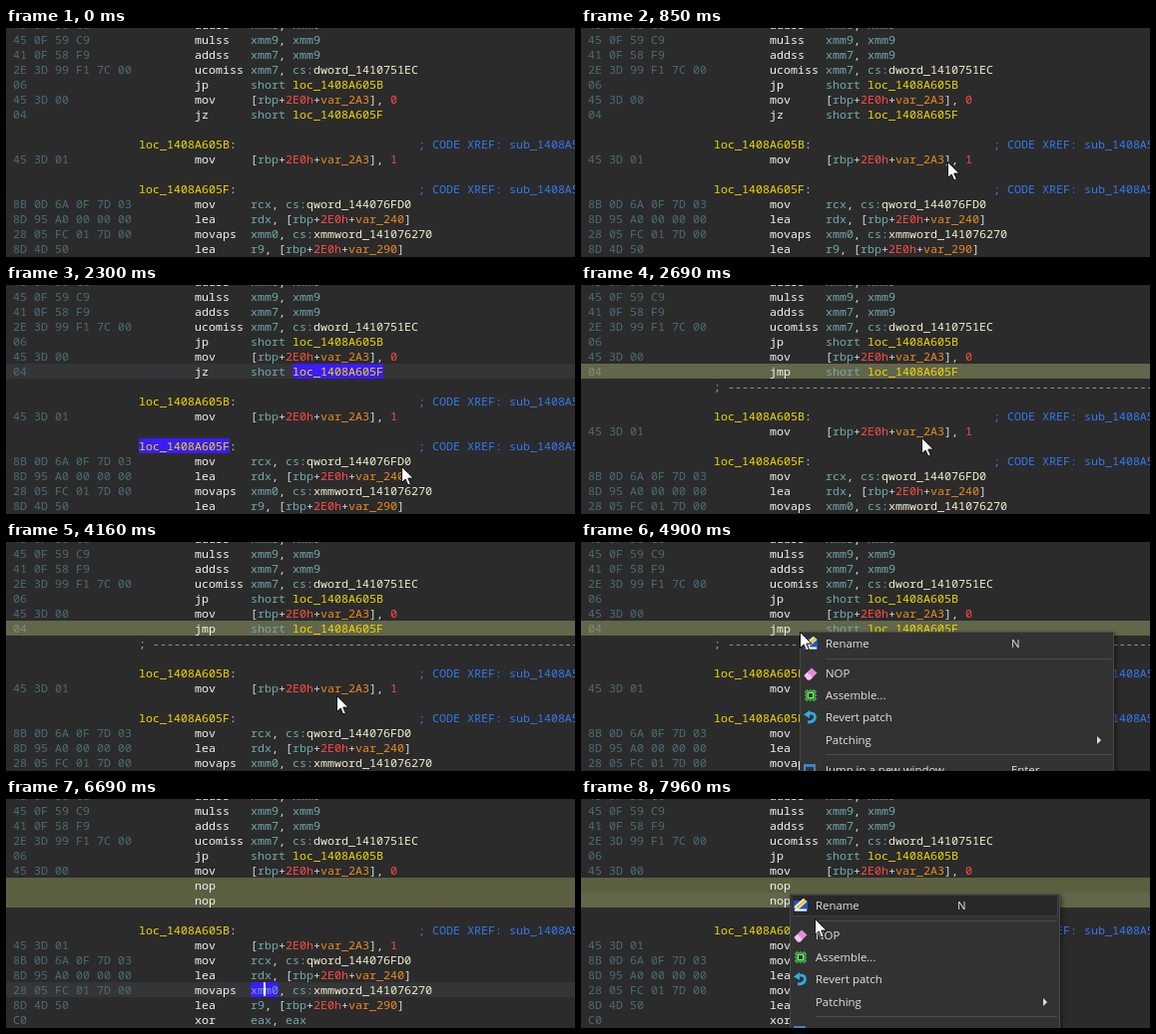
These frames come from a looping animation (570 px wide and 230 px high, 8000 ms). An HTML page:

```html
<!DOCTYPE html>
<html lang="en">
<head>
<meta charset="utf-8">
<title>Patching a jump in a disassembly</title>
<style>
html, body { margin: 0; width: 100%; height: 100%; overflow: hidden; background: #2b2b2b; }
#stage { position: relative; width: 570px; height: 230px; overflow: hidden; background: #2b2b2b; }
.row, .row span { position: absolute; white-space: pre; }
.row { left: 0; width: 570px; height: 15px; font: 11.667px/15px "Noto Sans Mono", "DejaVu Sans Mono", monospace; color: #d4dae0; }
.row span { top: 0; height: 15px; }
.patched { background: #5c6041; }
.current { background: #343536; }
.patched.current { background: #62664a; }
.hex { color: #4d6b78; }
.patched .hex { color: #878b78; }
.op { color: #f4f4f4; }
.loc { color: #f0d800; }
.var { color: #ee8a1c; }
.data { color: #f3f0cf; }
.reg { color: #73a9ad; }
.num { color: #ff4a42; }
.note { color: #3478f0; }
.rule { color: #a0a0a0; }
.row .hl { background: #3a1cff; }
#caret { position: absolute; width: 2px; height: 14px; background: #fff; }
#menu { position: absolute; height: 300px; box-sizing: border-box; background: #323232; border: 1px solid #4a4a4a;
  box-shadow: 2px 2px 4px rgba(0,0,0,.45); font: 11.4px/22px "Open Sans", "Noto Sans", sans-serif; color: #e4e4e4; }
.item { position: absolute; left: 1px; right: 1px; height: 22px; box-sizing: border-box; white-space: pre; }
.item.on { background: #282828; box-shadow: inset 0 0 0 1px #3e3e3e; }
.item span { position: absolute; top: 0; }
.item svg { position: absolute; left: 1px; top: 3px; }
.sep { position: absolute; left: 25px; right: 2px; height: 1px; background: #4c4c4c; }
#mouse { position: absolute; left: 0; top: 0; overflow: visible; }
</style>
</head>
<body>
<div id="stage">
  <div id="code"></div>
  <div id="caret"></div>
  <div id="menu"></div>
  <svg id="mouse" width="13" height="20"><path d="M.5 .5V16.5L4.2 13L6.7 19L9.3 17.9L6.8 12.1H12Z" fill="#fff" stroke="#111"/></svg>
</div>
<script>
const LOOP = 8000, CHAR = 7, LINE = 15, TOP = 4, LEFT = 7;
const $ = id => document.getElementById(id);
const codeBox = $('code'), caret = $('caret'), menuBox = $('menu'), mouse = $('mouse');

// ---- listing ----
const ins = (hex, op, args = '', patched = false) => ({ hex, op, args, patched });
const label = name => ({ name });
const blank = {}, rule = { rule: true };
const LOC_B = 'loc_1408A605B', LOC_F = 'loc_1408A605F';

const head = [
  ins('45 0F 58 C1', 'addss', 'xmm8, xmm9'),
  ins('45 0F 59 C9', 'mulss', 'xmm9, xmm9'),
  ins('41 0F 58 F9', 'addss', 'xmm7, xmm9'),
  ins('2E 3D 99 F1 7C 00', 'ucomiss', 'xmm7, cs:dword_1410751EC'),
  ins('06', 'jp', 'short ' + LOC_B),
  ins('45 3D 00', 'mov', '[rbp+2E0h+var_2A3], 0')
];
const partB = [blank, label(LOC_B), ins('45 3D 01', 'mov', '[rbp+2E0h+var_2A3], 1')];
const partF = [blank, label(LOC_F)];
const tail = [
  ins('8B 0D 6A 0F 7D 03', 'mov', 'rcx, cs:qword_144076FD0'),
  ins('8D 95 A0 00 00 00', 'lea', 'rdx, [rbp+2E0h+var_240]'),
  ins('28 05 FC 01 7D 00', 'movaps', 'xmm0, cs:xmmword_141076270'),
  ins('8D 4D 50', 'lea', 'r9, [rbp+2E0h+var_290]'),
  ins('C0', 'xor', 'eax, eax')
];
const nop = ins('', 'nop', '', true);
const listings = {
  plain: [...head, ins('04', 'jz', 'short ' + LOC_F), ...partB, ...partF, ...tail],
  jump: [...head, ins('04', 'jmp', 'short ' + LOC_F, true), rule, ...partB, ...partF, ...tail],
  nops: [...head, nop, nop, ...partB, ...partF, ...tail],
  merged: [...head, nop, nop, ...partB, ...tail]
};

const TOKEN = /(loc_\w+)|(var_\w+)|((?:d|q|xmm)word_\w+)|(xmm\d|rbp|rcx|rdx|r9|eax|cs:|short)|(\d\w*)|[^\w]+/g;
const KINDS = ['loc', 'var', 'data', 'reg', 'num'];

const span = (col, text, cls) => `<span class="${cls}" style="left:${LEFT + col * CHAR}px">${text}</span>`;

function tokens(text, col, mark) {
  return [...text.matchAll(TOKEN)].map(m => {
    const kind = KINDS[m.slice(1).findIndex(Boolean)] || '';
    return span(col + m.index, m[0], kind + (m[0] === mark ? ' hl' : ''));
  }).join('');
}

function rowHtml(r, mark) {
  if (r.rule) return span(18, '; ' + '-'.repeat(64), 'rule');
  if (r.name) return tokens(r.name + ':', 18, mark) + span(58, '; CODE XREF: sub_1408A5F0', 'note');
  if (r.op) return span(0, r.hex, 'hex') + span(26, r.op, 'op') + tokens(r.args, 34, mark);
  return '';
}

function drawCode({ list, mark, line }) {
  codeBox.innerHTML = listings[list].slice(0, 16).map((r, i) => {
    const n = i - 1;
    const cls = 'row' + (r.patched ? ' patched' : '') + (n === line ? ' current' : '');
    return `<div class="${cls}" style="top:${TOP + n * LINE}px">${rowHtml(r, mark)}</div>`;
  }).join('');
}

// ---- context menu ----
const svg = body => `<svg width="16" height="16">${body}</svg>`;
const icons = {
  rename: svg('<path d="M1 3H15V14H1Z" fill="#2454c8"/><path d="M2 12.5H14" stroke="#fff" stroke-width="2"/><path d="M3 11L12.5 2.5" stroke="#fff" stroke-width="5"/><path d="M4 10.5L13 2.5" stroke="#f0c030" stroke-width="3"/>'),
  eraser: svg('<path d="M1.5 10L9 2.5L14.5 7.5L7.5 14.5H5Z" fill="#e48bdc"/><path d="M1.5 10L4.5 7L10 12L7.5 14.5H5Z" fill="#f6c6f0"/>'),
  chip: svg('<path d="M2 4.5H14M2 8H14M2 11.5H14M4.5 2V14M8 2V14M11.5 2V14" stroke="#4fae4c" stroke-width="1.4"/><path d="M3 3H13V13H3Z" fill="#37a03a"/><path d="M5.5 5.5H10.5V10.5H5.5Z" fill="#173f1c" stroke="#9be08e"/>'),
  fork: svg('<path d="M3 4Q7 4 8 9" fill="none" stroke="#e04438" stroke-width="3"/><path d="M13 4Q9 4 8 9" fill="none" stroke="#3b8de8" stroke-width="3"/><path d="M8 8V14" stroke="#3fbf6a" stroke-width="3"/><path d="M1 1.5L6 2L2 6.5Z" fill="#e04438"/><path d="M15 1.5L10 2L14 6.5Z" fill="#3b8de8"/>'),
  revert: svg('<path d="M4 5Q12 2 12.5 8Q12 13 5 13" fill="none" stroke="#2cabe2" stroke-width="2.8"/><path d="M1 5.5L7 1V9Z" fill="#2cabe2"/>'),
  window: svg('<path d="M1 2H13V14H1Z" fill="#3f83c8"/><path d="M3 5H11V12H3Z" fill="#323232"/>')
};
const CENTERS = [12, 42, 64, 86, 109, 139];

function menuItems(patched) {
  return [
    ['rename', 'Rename', 'N'],
    ['eraser', 'NOP'],
    ['chip', 'Assemble...'],
    patched ? ['revert', 'Revert patch'] : ['fork', 'Force jump'],
    ['', 'Patching', '', true],
    ['window', 'Jump in a new window', 'Enter']
  ];
}

function drawMenu(m, hover) {
  const items = menuItems(m.patched).map(([icon, text, key, sub], i) =>
    `<div class="item${i === hover ? ' on' : ''}" style="top:${CENTERS[i] - 12}px">${icons[icon] || ''}` +
    `<span style="left:24px">${text}</span>` +
    (key ? `<span style="left:${m.w - 105}px">${key}</span>` : '') +
    (sub ? `<svg style="left:${m.w - 20}px" width="8" height="16"><path d="M1 4L5 8L1 12Z" fill="#ddd"/></svg>` : '') +
    '</div>').join('');
  menuBox.innerHTML = items + [26, 122].map(y => `<div class="sep" style="top:${y}px"></div>`).join('');
  menuBox.style.cssText = `left:${m.x}px;top:${m.y}px;width:${m.w}px`;
}

// ---- timeline ----
const menus = [
  { from: 1260, to: 2300, x: 335, y: 92, w: 315, patched: false },
  { from: 4900, to: 5580, x: 219, y: 90, w: 315, patched: true },
  { from: 7820, to: LOOP, x: 209, y: 95, w: 271, patched: true }
];
const views = [
  { at: 0, list: 'plain' },
  { at: 1000, list: 'plain', mark: LOC_F, line: 5 },
  { at: 2380, list: 'jump', mark: LOC_F, line: 5 },
  { at: 2690, list: 'jump', line: 5 },
  { at: 5580, list: 'nops', line: 5 },
  { at: 5710, list: 'merged', line: 5 },
  { at: 6490, list: 'merged', mark: 'xmm0', line: 12 },
  { at: 7680, list: 'merged', line: 6 }
];
const carets = [
  { from: 5580, to: 6030, x: 216, row: 5 },
  { from: 6490, to: 7020, x: 258, row: 12 },
  { from: 7550, to: 7680, x: 258, row: 12 }
];
// from, to, x0, y0, x1, y1: the pointer rests at the end of each move
const moves = [
  [450, 1120, 446, 232, 323, 80],
  [1259, 1260, 323, 80, 336, 92],
  [1400, 2240, 336, 92, 396, 182],
  [2300, 2440, 396, 182, 341, 153],
  [4110, 4160, 341, 153, 331, 154],
  [4160, 4750, 331, 154, 208, 78],
  [4850, 4900, 208, 78, 219, 90],
  [4900, 5440, 219, 90, 264, 130],
  [5580, 6030, 264, 130, 268, 178],
  [6250, 6480, 268, 178, 259, 188],
  [6490, 6690, 259, 188, 412, 240],
  [7230, 7700, 340, 236, 209, 94],
  [7959, 7960, 209, 94, 234, 120]
];
const ease = p => p * p * (3 - 2 * p);
const active = (list, t) => list.find(s => t >= s.from && t < s.to);

function pointer(t) {
  const m = moves.findLast(v => t >= v[0]);
  if (!m) return [446, 240];
  const [a, b, x0, y0, x1, y1] = m, p = ease(Math.min(1, (t - a) / (b - a)));
  return [Math.round(x0 + (x1 - x0) * p), Math.round(y0 + (y1 - y0) * p)];
}

let lastView, lastMenu;
function draw(t) {
  const view = views.findLast(v => t >= v.at);
  if (view !== lastView) drawCode(lastView = view);

  const [x, y] = pointer(t);
  mouse.style.transform = `translate(${x}px,${y}px)`;

  const m = active(menus, t);
  const hover = m ? CENTERS.findLastIndex(c => y - m.y >= c - 11) : -1;
  const key = m ? m.from + ':' + hover : '';
  if (m && key !== lastMenu) drawMenu(m, hover);
  lastMenu = key;
  menuBox.style.display = m ? 'block' : 'none';

  const c = active(carets, t);
  caret.style.display = c ? 'block' : 'none';
  if (c) {
    caret.style.left = c.x + 'px';
    caret.style.top = TOP + c.row * LINE + 'px';
  }
}

const start = performance.now();
function tick() {
  draw((performance.now() - start) % LOOP);
  requestAnimationFrame(tick);
}
tick();
</script>
</body>
</html>
```
